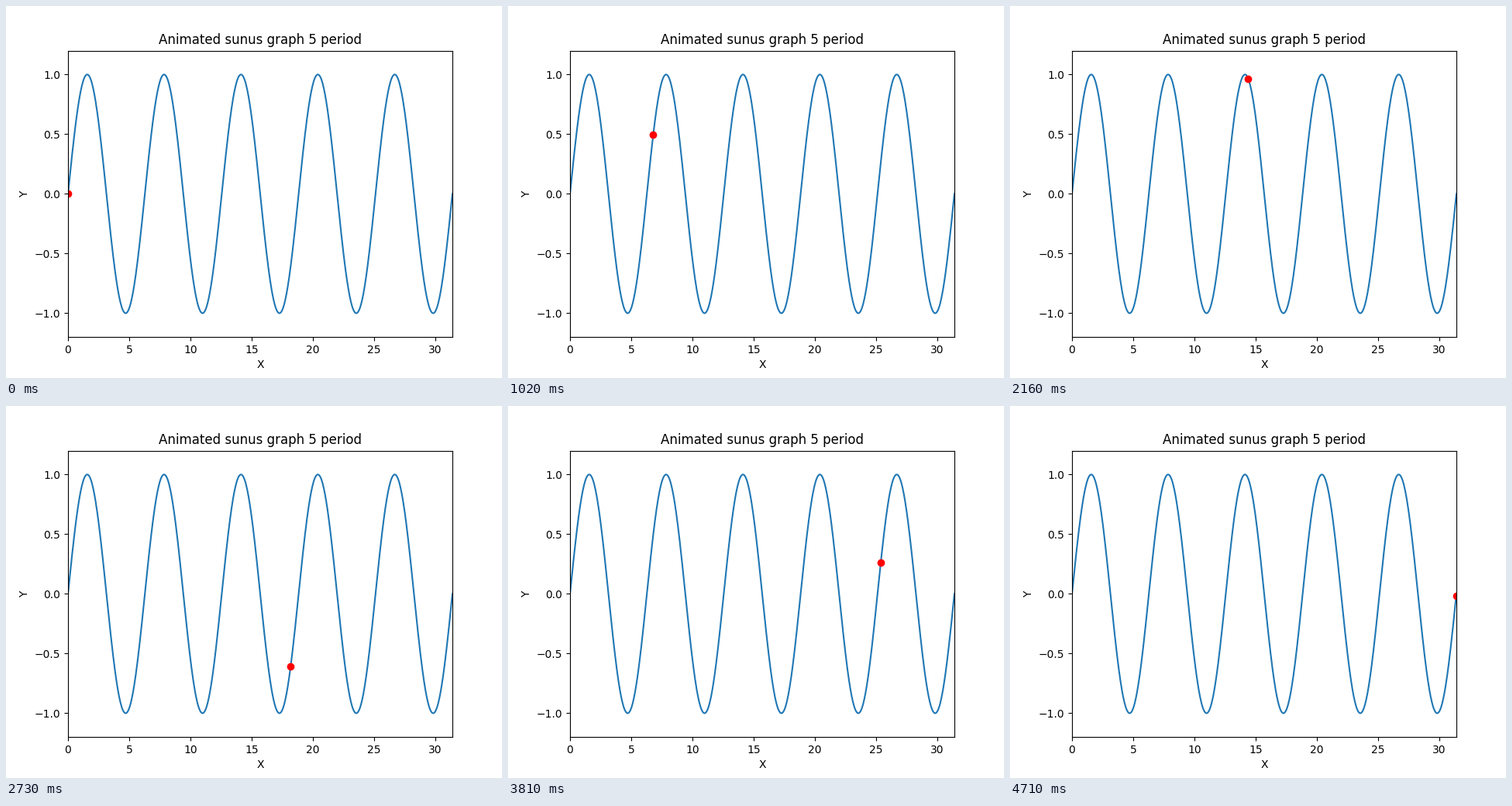
A matplotlib script for the animation above (4740 ms loop, 640 by 480 pixels).

```python
import numpy as np
import matplotlib.pyplot as plt
from matplotlib.animation import FuncAnimation

PERIODS = 5
STEP = 0.2
INTERVAL = 30
END = 2 * np.pi * PERIODS
FRAMES = 158

fig, ax = plt.subplots(figsize=(6.4, 4.8), dpi=100)
ax.set(xlim=(0, END), ylim=(-1.2, 1.2), xlabel="X", ylabel="Y",
       title="Animated sunus graph 5 period")

x = np.linspace(0, END, 1000)
ax.plot(x, np.sin(x))
dot, = ax.plot([0], [0], "ro")


def update(i):
    """Move the dot along the curve in even steps of x."""
    pos = i * STEP
    dot.set_data([pos], [np.sin(pos)])
    return dot,


anim = FuncAnimation(fig, update, frames=FRAMES, interval=INTERVAL,
                     repeat=True, repeat_delay=0)
plt.show()
```
